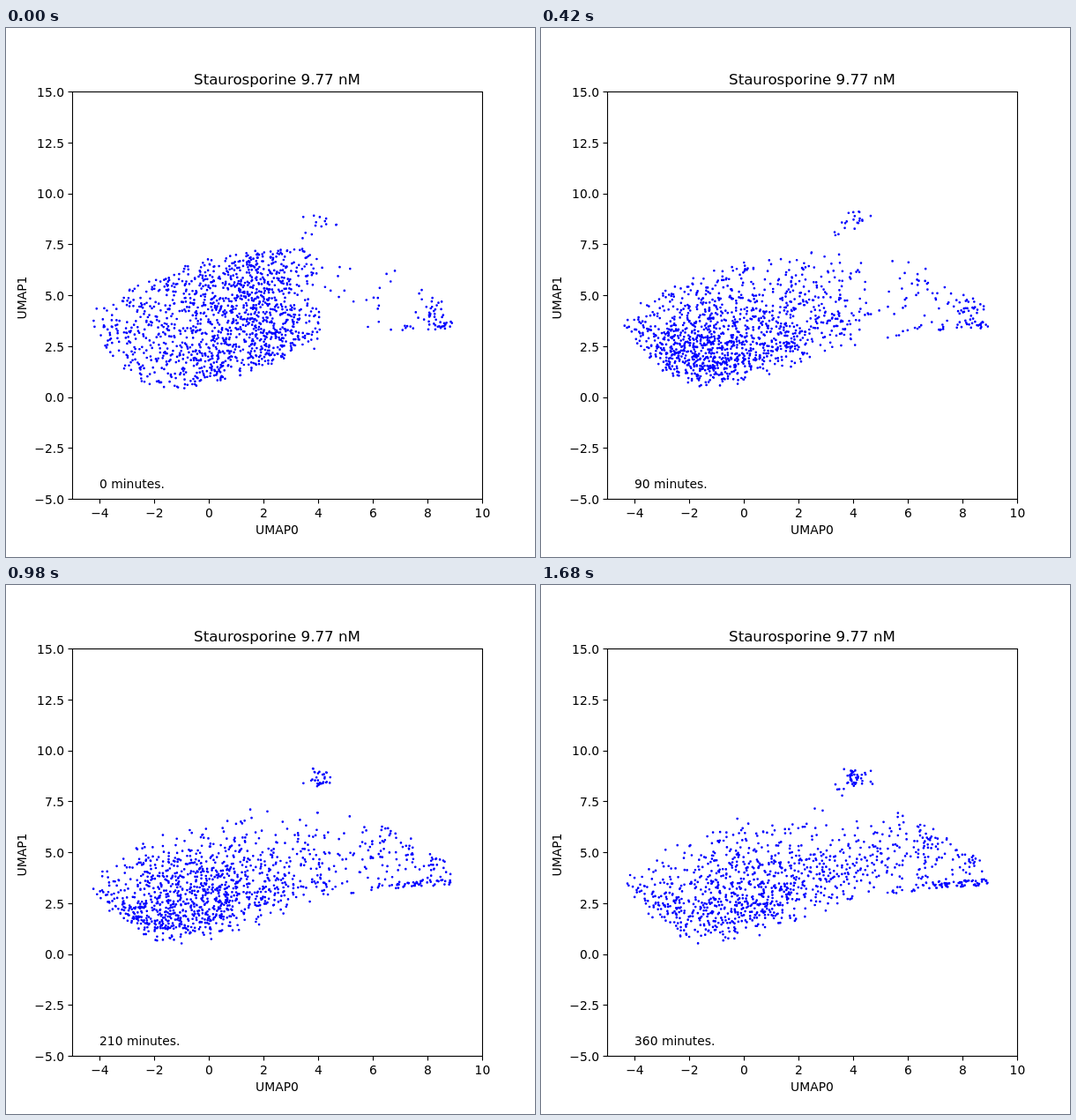
Recreate the animation shown at these times as an HTML page with a canvas. Size 600x600 px, loop 1820 ms.

```html
<!DOCTYPE html>
<html lang="en">
<head>
<meta charset="utf-8">
<title>Scatter over time</title>
<style>
  html, body { margin: 0; width: 100%; height: 100%; overflow: hidden; background: #fff; }
  svg, canvas { position: absolute; left: 0; top: 0; width: 600px; height: 600px; }
  text { font-family: "DejaVu Sans", Verdana, sans-serif; font-size: 13.89px; fill: #000; }
  .title { font-size: 16.67px; }
  .line { fill: none; stroke: #000; stroke-width: 1.11; }
</style>
</head>
<body>
<svg id="axes" viewBox="0 0 600 600"></svg>
<canvas id="dots" width="600" height="600"></canvas>
<script>
const STEP_MS = 140, STEPS = 13;
const px = x => 75 + (x + 5) * 31;
const py = y => 534 - (y + 5) * 23.1;

// Axes and labels
const svg = document.getElementById('axes');
function add(tag, attrs, content = '') {
  const el = document.createElementNS('http://www.w3.org/2000/svg', tag);
  for (const name in attrs) el.setAttribute(name, attrs[name]);
  el.textContent = content;
  return svg.appendChild(el);
}
const label = (content, x, y, anchor, more) =>
  add('text', { x, y, 'text-anchor': anchor, ...more }, content);
const signed = (v, digits) => (v < 0 ? '\u2212' : '') + Math.abs(v).toFixed(digits);
const crisp = v => Math.round(v) + 0.5;

add('rect', { class: 'line', x: 75.5, y: 72.5, width: 465, height: 462 });
for (let x = -4; x <= 10; x += 2) {
  add('path', { class: 'line', d: `M${crisp(px(x))} 534.5v5` });
  label(signed(x, 0), px(x) + 0.4, 555, 'middle');
}
for (let y = -5; y <= 15; y += 2.5) {
  add('path', { class: 'line', d: `M75.5 ${crisp(py(y))}h-5` });
  label(signed(y, 1), 66, Math.ceil(py(y) + 5.5), 'end');
}
label('Staurosporine 9.77 nM', 307.5, 64, 'middle', { class: 'title' });
label('UMAP0', 307.5, 574, 'middle');
label('UMAP1', 0, 0, 'middle', { transform: 'translate(23 306) rotate(-90)' });
const clock = label('', 106, 522, 'start');

// Outline of the whole cloud
const LEFT = -4.4, RIGHT = 8.95;
const low = x => x < -1.4
  ? 0.4 + 0.33 * (x + 1.4) ** 2
  : 0.4 + 3 * (1 - Math.exp(-(((x + 1.4) / 5.1) ** 2)));
const high = x => 7.3 - (x < 3 ? 0.058 : 0.094) * (x - 3) ** 2;
const inside = (x, y) => x < RIGHT && y > low(x) && y < high(x) + 0.3;

function seeded(seed) {
  return () => {
    seed = (seed + 0x6D2B79F5) | 0;
    let t = Math.imul(seed ^ (seed >>> 15), 1 | seed);
    t = (t + Math.imul(t ^ (t >>> 7), 61 | t)) ^ t;
    return ((t ^ (t >>> 14)) >>> 0) / 4294967296;
  };
}

function makeCloud(step) {
  const rnd = seeded(step * 7919 + 41);
  const bell = () => rnd() + rnd() + rnd() - 1.5;
  const triangle = (from, mode, to) => {
    const u = rnd(), span = to - from, rise = mode - from;
    return u < rise / span
      ? from + Math.sqrt(u * span * rise)
      : to - Math.sqrt((1 - u) * span * (to - mode));
  };
  const points = [];
  function fill(count, pick) {
    const end = points.length + Math.round(count);
    while (points.length < end) {
      const [x, y] = pick();
      if (inside(x, y)) points.push([x, y]);
    }
  }

  // Main body: its crest runs left, then drifts slowly back
  const crest = -2.3 + 4.1 * Math.exp(-0.9 * step) + 0.14 * step;
  const settle = 1 - 0.85 * Math.exp(-0.7 * step);
  fill(1350 - 37 * step, () => {
    const x = triangle(LEFT, crest, 4.4 + 0.12 * step);
    const f = rnd() < settle ? triangle(0, 0.2, 1) : rnd();
    return [x, low(x) + f * (high(x) - low(x))];
  });

  // Right side: a growing cloud, a thin lower band and the far end
  fill(20 + 9 * step, () => [6.5 + 2 * bell(), 5.1 + 1.8 * bell()]);
  fill(20 + 4 * step, () => {
    const x = 5 + 3.95 * Math.sqrt(rnd());
    return [x, low(x) + 0.35 * rnd()];
  });
  fill(32 - 1.3 * step, () => [8.25 + 0.6 * bell(), 4.3 + 0.9 * bell()]);

  // Small upper cluster with a trailing tail
  for (let n = 0; n < 14 + 2.3 * step; n++) {
    const u = rnd();
    points.push(rnd() < 0.28
      ? [3.3 + u, 8 + 0.6 * u + 0.4 * bell()]
      : [4.12 + 0.5 * bell(), 9.1 - 0.8 * u]);
  }
  return points;
}

const clouds = Array.from({ length: STEPS }, (_, step) => makeCloud(step));
const ctx = document.getElementById('dots').getContext('2d');
let shown = -1;

function show(step) {
  if (step === shown) return;
  shown = step;
  clock.textContent = step * 30 + ' minutes.';
  ctx.clearRect(0, 0, 600, 600);
  ctx.fillStyle = '#00f';
  ctx.beginPath();
  for (const [x, y] of clouds[step]) {
    ctx.moveTo(px(x) + 1.35, py(y));
    ctx.arc(px(x), py(y), 1.35, 0, Math.PI * 2);
  }
  ctx.fill();
}

const start = performance.now();
function tick() {
  const elapsed = Math.max(0, performance.now() - start);
  show(Math.floor(elapsed / STEP_MS) % STEPS);
  requestAnimationFrame(tick);
}
tick();
</script>
</body>
</html>
```
